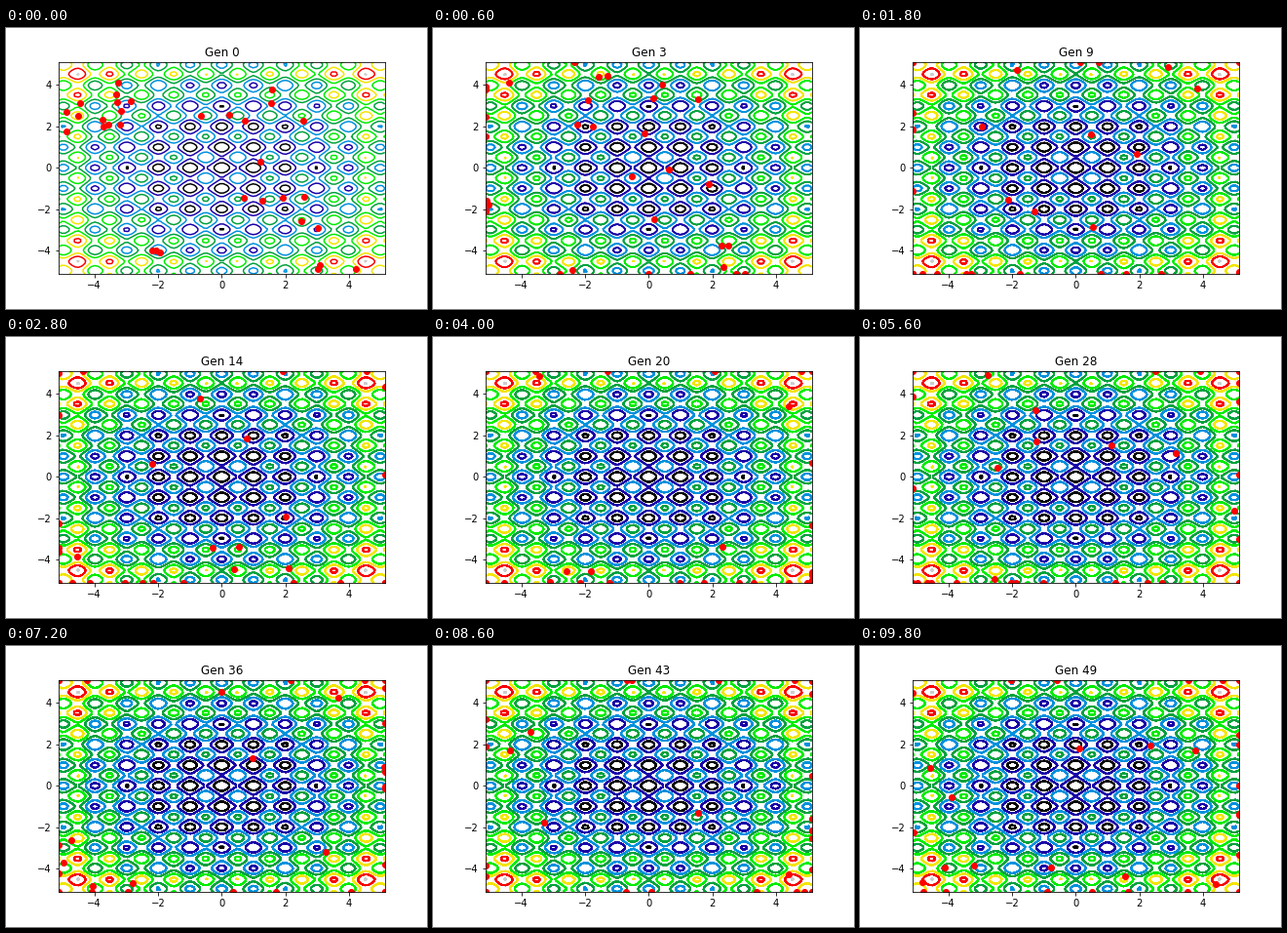
A matplotlib script for the animation above (10 s loop, 432x288 px).

```python
import numpy as np
import matplotlib.pyplot as plt
from matplotlib.animation import FuncAnimation

GENS, STEP_MS = 50, 200
LIM = 5.12
INERTIA, KICK = 0.8, 1.0

# Starting groups: centre x, centre y, number of points
GROUPS = [(-3.3, 2.9, 13), (1.6, 3.0, 6), (1.8, -1.5, 7),
          (-2.0, -4.6, 3), (2.9, -4.3, 3)]

plt.rcParams.update({"font.family": "DejaVu Sans", "font.size": 10})
fig = plt.figure(figsize=(6, 4), dpi=72, facecolor="white")
ax = fig.add_axes([0.125, 0.125, 0.775, 0.755])
ax.patch.set_visible(False)

# Rastrigin function
grid = np.linspace(-LIM, LIM, 100)
X, Y = np.meshgrid(grid, grid)
Z = 20 + X**2 + Y**2 - 10 * (np.cos(2 * np.pi * X) + np.cos(2 * np.pi * Y))


def contour_layer():
    """One antialiased pass of the contour lines as RGBA pixels."""
    lines = ax.contour(X, Y, Z, levels=np.arange(10, 90, 10),
                       cmap="nipy_spectral", linewidths=1.5)
    ax.set_axis_off()
    fig.patch.set_visible(False)
    fig.canvas.draw()
    pixels = np.array(fig.canvas.buffer_rgba())
    lines.remove()
    ax.set_axis_on()
    fig.patch.set_visible(True)
    return pixels


layer = contour_layer()
cover = layer[..., 3] / 255


def stacked(passes):
    """Lines painted over themselves: soft edges fill up with every pass."""
    out = layer.copy()
    out[..., 3] = np.rint(255 * (1 - (1 - cover) ** passes))
    return out


def evolve():
    """Positions for every generation: a drifting swarm held by the box."""
    rng = np.random.default_rng(7)
    pos = np.vstack([rng.normal((x, y), 0.9, (n, 2)) for x, y, n in GROUPS])
    pos = np.clip(pos, 0.25 - LIM, LIM - 0.25)
    speed = np.zeros_like(pos)
    history = [pos]
    for _ in range(GENS - 1):
        speed = INERTIA * speed + rng.normal(0, KICK, pos.shape)
        pos = np.clip(pos + speed, -LIM, LIM)
        history.append(pos)
    return history


swarm = evolve()

ax.set(xlim=(-LIM, LIM), ylim=(-LIM, LIM),
       xticks=range(-4, 5, 2), yticks=range(-4, 5, 2))
title = ax.set_title("Gen 0", fontsize=12)
dots, = ax.plot([], [], "ro", markersize=6)
image = fig.figimage(layer, origin="upper", zorder=-1)


def draw(gen):
    image.set_data(stacked(gen + 1))
    dots.set_data(*swarm[gen].T)
    title.set_text(f"Gen {gen}")
    return image, dots, title


def init():
    return draw(0)


anim = FuncAnimation(fig, draw, frames=GENS, init_func=init,
                     interval=STEP_MS, repeat=True, repeat_delay=0)
plt.show()
```
